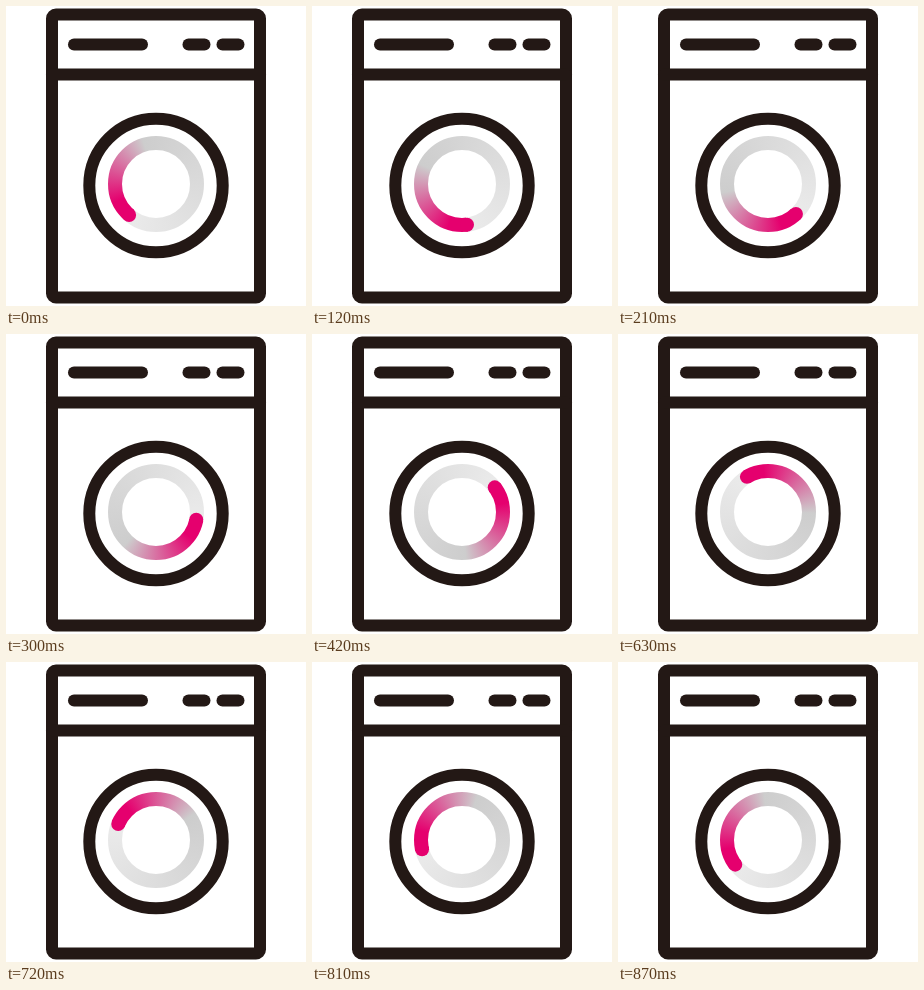
Animation, 300 px wide and 300 px high, one loop 0.9 s. Source, as an HTML page with a canvas:

```html
<!DOCTYPE html>
<html>
<head>
<meta charset="utf-8">
<title>Washing machine</title>
<style>
html, body { margin: 0; height: 100%; overflow: hidden; background: #fff; }
canvas { display: block; }
</style>
</head>
<body>
<canvas id="stage" width="300" height="300"></canvas>
<script>
const ctx = document.getElementById('stage').getContext('2d');
const TAU = Math.PI * 2;
const INK = '#231815', PINK = '#e5006e';
const LOOP = 900, STEP = 30, START = 131;
const drum = { x: 150, y: 178, r: 41, width: 14 };

function line(x1, x2, y) {
  ctx.beginPath();
  ctx.moveTo(x1, y);
  ctx.lineTo(x2, y);
  ctx.stroke();
}

function circle(x, y, r) {
  ctx.beginPath();
  ctx.arc(x, y, r, 0, TAU);
}

function drawMachine() {
  ctx.strokeStyle = INK;
  ctx.lineWidth = 12;
  ctx.lineCap = 'round';
  ctx.beginPath();
  ctx.roundRect(46, 8.5, 208, 283, 4);
  ctx.stroke();
  line(46, 254, 68.5);
  line(68, 136, 38.5);
  line(182.5, 198.5, 38.5);
  line(216.5, 232.5, 38.5);
  circle(150, 179.5, 66.7);
  ctx.stroke();
}

function drawSpinner(angle) {
  const { x, y, r, width } = drum;
  const sweep = ctx.createConicGradient(angle, x, y);
  sweep.addColorStop(0, PINK);
  sweep.addColorStop(0.07, PINK);
  sweep.addColorStop(0.34, '#cdcdcd');
  sweep.addColorStop(1, '#ebebeb');
  ctx.strokeStyle = sweep;
  ctx.lineWidth = width;
  circle(x, y, r);
  ctx.stroke();
  ctx.fillStyle = PINK;
  circle(x + r * Math.cos(angle), y + r * Math.sin(angle), width / 2);
  ctx.fill();
}

function frame() {
  const step = Math.floor((performance.now() % LOOP) / STEP);
  ctx.clearRect(0, 0, 300, 300);
  drawMachine();
  drawSpinner((START / 360 - step * STEP / LOOP) * TAU);
  requestAnimationFrame(frame);
}
frame();
</script>
</body>
</html>
```
